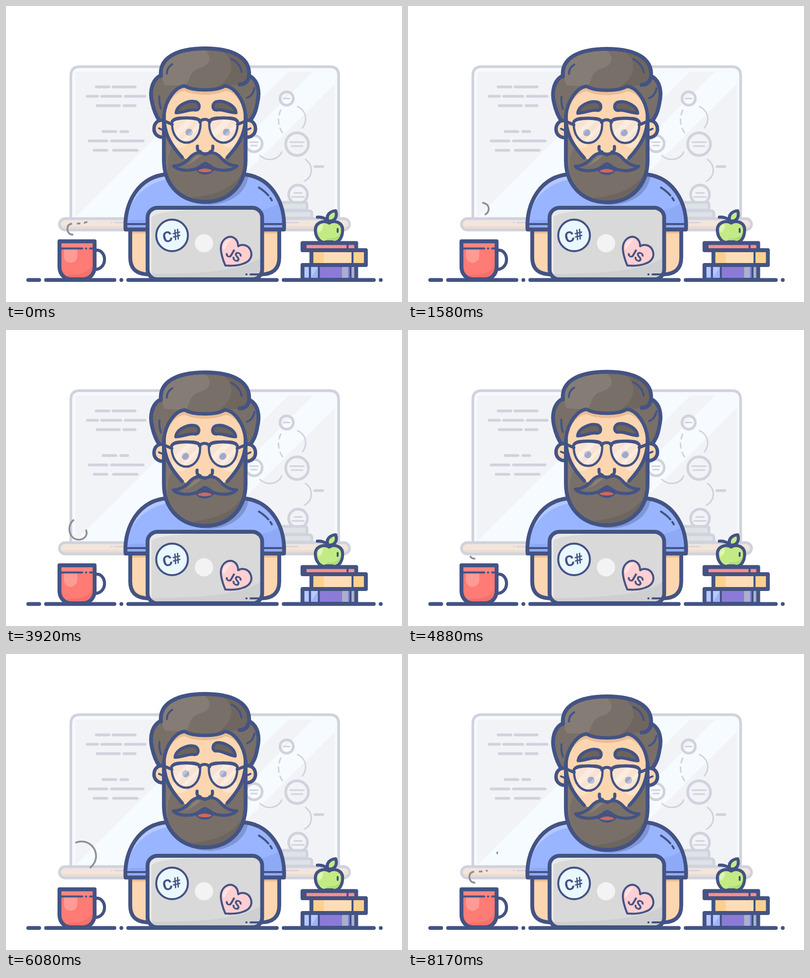
Animation, 800 px wide and 600 px high, one loop 8210 ms. Source, as an HTML page:

```html
<!DOCTYPE html>
<html lang="en">
<head>
<meta charset="utf-8">
<title>Developer at work</title>
<style>
html, body { margin: 0; width: 100%; height: 100%; overflow: hidden; background: #fff; }
svg { display: block; width: 100vw; height: 100vh; }
.ink { stroke: #435384; stroke-width: 7.8; stroke-linecap: round; stroke-linejoin: round; }
.mid { stroke-width: 6.2; }
.thin { stroke-width: 4; }
.line { fill: none; }
.pale { stroke: #d0d2dd; stroke-width: 5.4; stroke-linecap: round; stroke-linejoin: round; }
.hair { fill: #786f68; }
.skin { fill: #fcd6b1; }
text { font-family: Roboto, "Liberation Sans", sans-serif; font-weight: 700; fill: #435384; text-anchor: middle; }
</style>
</head>
<body>
<svg viewBox="0 0 800 600" xmlns="http://www.w3.org/2000/svg">
<defs>
  <clipPath id="shirtClip"><path id="shirtShape" d="M241.500 453C238 398 269 345 326 341H478C535 345 565 398 561.500 453Z"/></clipPath>
  <clipPath id="laptopClip"><rect x="286" y="409" width="231.500" height="145" rx="20"/></clipPath>
  <clipPath id="mugClip"><path d="M108 477H179V529C179 543 169 554 155 554H132C118 554 108 543 108 529Z"/></clipPath>
  <clipPath id="beardClip"><path d="M319 232V312C319 365 355 397 402 397S484 365 484 312V232Z"/></clipPath>
  <clipPath id="skinClip"><path d="M319 222C322 188 344 163 361 162C371 168 386 170 402 170S432 168 442 162C460 163 481 188 484 222C484 262 468 284 447 307L402 326L356 307C335 284 319 262 319 222Z"/></clipPath>
  <clipPath id="hairClip"><path d="M312 142C309 105 345 86 402 86S494 105 491 142V160H440L402 172L361 162L330 180Z"/></clipPath>
  <path id="lensShape" d="M335 234C337 226 350 226 364 226S390 226 392 234C394 261 380 277 364 277S333 261 335 234Z"/>
  <clipPath id="lensClip"><use href="#lensShape"/></clipPath>
  <g id="glare" fill="#fff" opacity=".32">
    <path d="M330 266L374 222H389L338 275Z"/><path d="M350 277L395 232V241L359 279Z"/>
  </g>
  <path id="brow" d="M343 216.500C345 199 371 190 384 194.500C392 199 391 211 383 211C372 208 359 216 343 216.500Z"/>
</defs>

<g id="board">
  <path class="pale" fill="#f6fafe" d="M131 432V141Q131 123 149 123H654Q672 123 672 141V432Z"/>
  <path fill="#f2f3f7" d="M140 428V133H664V428Z"/>
  <path fill="#f6fbff" d="M140 428L435 133H570L275 428ZM620 133H664V158L394 428H325Z"/>
  <path class="pale line" d="M182 164H208M216 164H261M164 183H185M193 183H232M241 183H281M184 202H229M238 202H261M196 254.500H222M232 254.500H246M168 273.500H204M213 273.500H277M178 292.500H204M217 292.500H265M624 325.500H640"/>
  <g class="pale line">
    <circle cx="567" cy="187.500" r="13.500"/><circle cx="588" cy="280" r="23"/>
    <circle cx="501" cy="279" r="16.500"/><circle cx="590" cy="382" r="19"/>
  </g>
  <path class="pale line" style="stroke-width:3" d="M561 187.500H573M574 276H602M577 284H599M493 276H509M495 283H507M582 379H598M578 387H602M589 204C605 211 611 230 599 247M513 303C527 316 549 313 557 296M605 311C621 322 621 345 603 355"/>
  <path class="pale line" style="stroke-width:3" stroke-dasharray="10 9" d="M555 211C548 226 549 244 560 259"/>
  <path class="pale" fill="#dde2e7" d="M556 398H604Q608 398 608 402V414H556ZM556 415H612Q618 415 618 421V430H556Z"/>
  <rect class="pale" fill="#f1e5dd" x="108" y="431" width="586" height="23" rx="11.500"/>
  <path fill="#eddcd0" d="M112 446H690Q688 451 682 451H120Q114 451 112 446Z"/>
  <path class="pale line" style="stroke-width:2.500" d="M213 439H214M220 439H241M565 439H590"/>
</g>

<path id="steam" fill="none" stroke="#8f8e98" stroke-width="3.600" pathLength="253"
  d="M136 463.500C128 464 124 458 124 452C124 444 129 441 136 441C148 441 159 441 167 436C176 429 182 420 182 410C182 393 169 380 152 380C138 380 128 390 128 403C128 416 136 425 147 425C156 425 163 419 163 411C163 404 157 399 150 399"/>
<path id="wisp" fill="#8f8e98" d="M178 402L182 400L181.500 406L179.500 406Z"/>

<g id="mug">
  <path class="ink line mid" d="M182 495C192 494 199 503 199 514S191 534 180 534"/>
  <g clip-path="url(#mugClip)">
    <path fill="#ff7b75" d="M100 470H190V560H100Z"/>
    <path fill="#fa8680" d="M100 470H190V490H100Z"/>
    <path fill="#ff9b94" d="M117 493H144V507A13.500 13.500 0 0 1 117 507Z"/>
    <path fill="#f3716d" d="M180 505C178 535 160 546 123 545L130 556H180Z"/>
  </g>
  <path class="ink line" d="M108 477H179V529C179 543 169 554 155 554H132C118 554 108 543 108 529Z"/>
  <path class="ink line thin" d="M110 491.500H154M161.500 491.500H162M170 491.500H178"/>
</g>

<g id="books">
  <path fill="#8c7ad9" d="M598 525H708V553H598Z"/>
  <path fill="#9fb3fb" d="M598 525H632V553H598Z"/>
  <path fill="#b7c9ff" d="M602 528H611V549H602ZM617 528H631L617 549Z"/>
  <path fill="#a9b1cd" d="M679 525H691V553H679ZM697 525H708V553H697Z"/>
  <path fill="#ffdcb8" d="M617 495H727V525H617Z"/>
  <path fill="#fdd08f" d="M620 498H642V522H620ZM701 498H724V522H701Z"/>
  <path fill="#ff8e89" d="M598 480H708V495H598Z"/>
  <path class="ink line" d="M599 480.500H707.500V495H599ZM617 495H727V525H617ZM599 525H707.500V555H599Z"/>
  <path class="ink line thin" d="M605 482V493M690 482V493M700 497V523M614 527V551M632 527V551M696 527V551"/>
  <path class="ink mid" fill="#c4ea86" d="M653 440C644 434 625 437 625 454C625 468 634 479 643 479C648 479 648 477 653 477S659 479 664 479C673 479 680 468 680 454C680 437 662 434 653 440Z"/>
  <path fill="#ade072" d="M677 453C676 466 668 471 650 471L645 475H665Q677 470 677 453Z"/>
  <path fill="#e0f5b7" d="M630 453C630 444 637 442 641 443C640 451 637 458 631 459Z"/>
  <path class="ink mid line" d="M629 428C637 427 647 430 653 439"/>
  <path class="ink thin line" d="M670 452V458"/>
  <path class="ink mid" fill="#c4ea86" d="M651 436C645 425 654 416 666 415C670 427 665 437 651 436Z"/>
</g>

<g id="body">
  <path class="ink skin" d="M251 453V510C251 533 264 544 290 544H515C539 544 552 533 552 510V453Z"/>
  <path fill="#e8b98f" d="M255 455H286V461H255ZM518 455H548V461H518Z"/>
  <use href="#shirtShape" fill="#99b5ff"/>
  <g clip-path="url(#shirtClip)">
    <path fill="#b4c8ff" d="M241 443C246 397 276 360 328 351V338H280L235 380V443Z"/>
    <path fill="#8eaaf7" d="M248 434C340 431 510 431 550 400L560 434V455H241Z"/>
    <path id="chinShadow" fill="#7f96d4" d="M330 342C340 385 375 403 410 403C455 402 489 376 490 340Z"/>
    <path fill="#8eaaf7" d="M244 443H559V452H244Z"/>
  </g>
  <use href="#shirtShape" class="ink line"/>
  <path class="ink line thin" d="M244 442H288M517 442H559M511 368C519 373 525 378 530 384M534 389L537 394"/>
</g>

<g id="head">
  <path class="ink hair" d="M314 140C294 149 290 174 295 195C299 214 304 224 311 234H492C500 224 505 214 508 195C513 174 510 149 489 140Z"/>
  <path class="ink skin" style="stroke-width:7" d="M319 232C306 229 299 239 299 249S307 267 319 266M484 232C497 229 504 239 504 249S496 267 484 266"/>
  <path class="ink line thin" d="M309 248L316 251M494 248L487 251"/>
  <path class="hair" d="M319 215V312C319 365 355 397 402 397S484 365 484 312V215Z"/>
  <g clip-path="url(#beardClip)">
    <path fill="#827971" d="M319 250V312C319 328 323 338 328 347C324 320 328 290 338 286Z"/>
    <path fill="#6d655f" d="M484 315C480 355 440 383 375 388L402 400H484Z"/>
  </g>
  <g clip-path="url(#skinClip)">
    <path class="skin" d="M310 150H490V330H310Z"/>
    <path fill="#e9bd95" d="M319 222C322 188 344 163 361 162C371 168 386 170 402 170S432 168 442 162C460 163 481 188 484 222C477 195 462 173 443 172C430 178 415 180 402 180S374 178 361 172C342 173 327 195 319 222Z"/>
    <g fill="#fee2c6"><circle cx="352" cy="271" r="16"/><circle cx="451" cy="271" r="16"/></g>
  </g>
  <path class="hair" d="M314 142C309 105 345 86 402 86S494 105 491 142C489 153 483 159 472 159C485 173 485 188 484 210C479 185 460 163 442 162C432 168 418 170 402 170S371 168 361 162C344 163 324 185 319 210L306 160Z"/>
  <g clip-path="url(#hairClip)">
    <path fill="#857d75" d="M316 140C316 103 355 89 402 90C417 102 414 119 393 125C366 133 374 153 361 162L317 160Z"/>
    <path fill="#6e665f" d="M438 92C462 108 465 145 420 168L474 158L489 145V112Z"/>
  </g>
  <path class="ink line" d="M356 307C335 284 319 262 319 222C322 188 344 163 361 162C371 168 386 170 402 170S432 168 442 162C460 163 481 188 484 222C484 262 468 284 447 307" style="stroke-width:7"/>
  <path class="ink line" d="M319 222V312C319 365 355 397 402 397S484 365 484 312V222"/>
  <path class="ink line" d="M313 142C309 105 345 86 402 86S494 105 491 142C489 153 483 159 472 159"/>
  <path class="ink line thin" d="M325 137C325 129 329 122 336 118M455 107C467 113 474 122 476 134M310 183C309 192 310 199 313 208M502 166C500 177 495 183 487 186"/>

  <g id="face">
    <use id="browL" href="#brow" class="ink mid" fill="#6b635c"/>
    <g id="browR"><use href="#brow" class="ink mid" fill="#6b635c" transform="matrix(-1 0 0 1 807 0)"/></g>
    <g fill="#f8e3d2"><use href="#lensShape"/><use href="#lensShape" x="75"/></g>
    <g id="eyes" fill="#a0a9c9"><circle cx="361" cy="256" r="7.300"/><circle cx="436.500" cy="256" r="7.300"/></g>
    <g clip-path="url(#lensClip)"><use href="#glare"/></g>
    <g transform="translate(75 0)"><g clip-path="url(#lensClip)"><use href="#glare"/></g></g>
    <g class="ink line" style="stroke-width:4.500"><use href="#lensShape"/><use href="#lensShape" x="75"/></g>
    <path class="ink line mid" d="M319 233L335 240M484 233L467 240M335 234C340 225 386 224 392 234M410 234C415 225 461 224 467 234M391 235C395 228 407 228 411 235"/>
    <path class="ink" style="stroke-width:5" fill="#435384" d="M382 325C388 344 415 344 421 325Z"/>
    <path fill="#d0685a" d="M387 334C393 328 410 328 416 334C410 338 393 338 387 334Z"/>
    <path class="ink mid hair" d="M402 301C388 293 378 299 370 308C362 318 350 324 338 324C345 333 365 335 380 331C390 328 395 321 402 319C409 321 414 328 424 331C440 335 458 333 466 324C454 324 442 318 434 308C426 299 416 293 402 301Z"/>
    <path fill="#8a8179" d="M394 303C385 300 379 307 372 315C365 322 358 325 352 326C368 323 380 315 394 303Z"/>
    <path class="skin" d="M386 284L391 295C394 301 410 301 412 295L417 284Z"/>
    <path class="ink line mid" d="M386 284C385 292 388 295 392 295C394 301 410 301 412 295C415 295 418 292 417 284"/>
  </g>
</g>

<g id="laptop">
  <g clip-path="url(#laptopClip)">
    <path fill="#d9d9da" d="M280 400H520V560H280Z"/>
    <path fill="#e8e8e9" d="M289 550V426Q289 412 304 412H500Q294 410 294 430V550Z"/>
    <path fill="#cecfd1" d="M289 543C390 543 480 538 517 508V554H289Z"/>
  </g>
  <rect class="ink line" x="286" y="409" width="231.500" height="145" rx="20"/>
  <circle cx="400" cy="481" r="18.500" fill="#f3f3f4"/>
  <circle class="ink thin" cx="335.500" cy="465" r="32" fill="#eaf7ff"/>
  <text font-size="30" transform="translate(337.500 476) rotate(-14)">C#</text>
  <path class="ink thin" fill="#ffcfd1" d="M443 526C438 514 434 500 434 490C435 472 449 465 459 469C467 473 469 479 469 487C476 482 488 484 493 493C500 506 493 518 480 522C470 526 455 527 443 526Z"/>
  <path fill="#ffe4e4" d="M438 490C439 477 448 472 456 473C449 478 446 487 440 495Z"/>
  <text font-size="27" transform="translate(455.500 513) rotate(30)">JS</text>
  <path class="ink line thin" d="M485.500 544H486M494 544H516"/>
</g>
<path class="ink line" d="M45 555.300H67M81 555.300H219M233 555.300H233.100M247 555.300H547M561 555.300H743M757 555.300H757.100"/>
</svg>
<script>
const LOOP = 8210, PUFF = LOOP / 3, PUFF_START = 7200;
const el = id => document.getElementById(id);
const clamp = v => Math.min(1, Math.max(0, v));
const smooth = v => v * v * (3 - 2 * v);
const linear = v => v;

function track(keys, t, ease = smooth) {
  if (t <= keys[0][0]) return keys[0][1];
  for (let i = 1; i < keys.length; i++) {
    const [t0, a] = keys[i - 1], [t1, b] = keys[i];
    if (t <= t1) return a + (b - a) * ease(clamp((t - t0) / (t1 - t0)));
  }
  return keys[keys.length - 1][1];
}

const move = (id, x, y, extra = "") => el(id).setAttribute("transform", `translate(${x} ${y})${extra}`);

const steamHead = [[0, 0], [416, 12], [1010, 64], [1616, 155], [2280, 253]];
const steamTail = [[1030, 0], [1616, 70], [2590, 219], [2890, 253]];
const inkSpans = [[0, 34], [43, 50], [57, 253]];

// Dash pattern that shows only the visible stretches of the steam curl.
function steamDashes(t) {
  const phase = (t - PUFF_START + LOOP) % PUFF;
  const windows = [phase, phase + PUFF].map(p => [track(steamTail, p, linear), track(steamHead, p, linear)]);
  const dashes = [0];
  let end = 0;
  for (const [tail, head] of windows)
    for (const [a, b] of inkSpans) {
      const from = Math.max(a, tail), to = Math.min(b, head);
      if (to > from && from >= end) {
        dashes.push(from - end, to - from);
        end = to;
      }
    }
  return dashes.length > 1 ? [0, ...dashes.slice(1), 600].join(" ") : "0 600";
}

function draw(t) {
  const lift = track([[4700, 0], [5250, 1], [7250, 1], [7800, 0]], t);
  const bob = track([[0, 0], [1500, .8], [2800, 0]], t);
  const eyeX = track([[0, 9], [700, 0], [3400, 0], [4200, 2], [7250, 2], [7850, 9]], t);
  const sway = track([[0, .7], [700, 0], [7250, 0], [7850, .7]], t);
  move("head", 0, bob - 5 * lift);
  move("face", sway, -lift);
  move("eyes", eyeX - sway, -7.3 * lift);
  move("browL", -1.5 * lift, -lift);
  move("browR", -lift, -3.5 * lift, ` rotate(${7 * lift} 464 216)`);
  move("chinShadow", 0, -4 * lift);
  el("steam").setAttribute("stroke-dasharray", steamDashes(t));
  el("wisp").style.display = t > 6900 ? "" : "none";
}

const began = performance.now();
function tick() {
  draw((performance.now() - began) % LOOP);
  requestAnimationFrame(tick);
}
tick();
</script>
</body>
</html>
```
